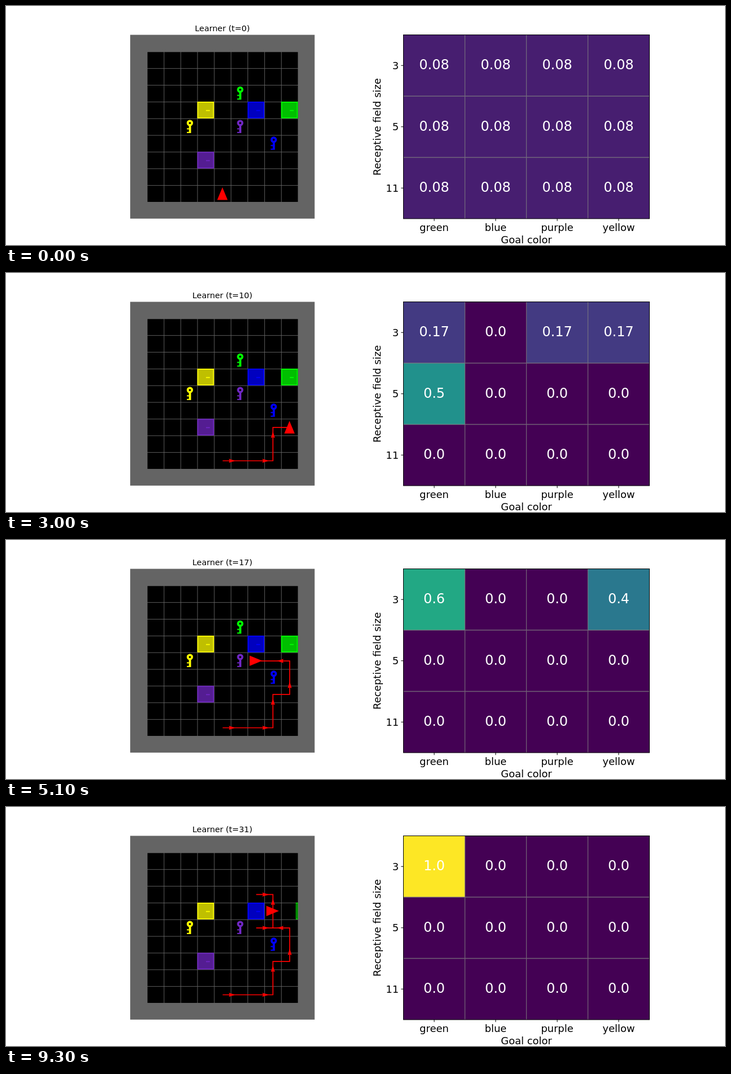
These frames come from a looping animation (1280x427 px, 9.6 s). An HTML page:

```html
<!DOCTYPE html>
<html lang="en">
<head>
<meta charset="utf-8">
<title>Learner</title>
<style>
  html, body { margin: 0; width: 100%; height: 100%; overflow: hidden; background: #fff; }
  svg { display: block; width: 100%; height: 100%; font-family: "DejaVu Sans", sans-serif; }
</style>
</head>
<body>
<svg id="stage" viewBox="0 0 1280 427"></svg>
<script>
const STEP_MS = 300, STEPS = 32;
const stage = document.getElementById('stage');

// Drawing helpers
const rect = (x, y, w, h, fill, extra = '') =>
  `<rect x="${x}" y="${y}" width="${w}" height="${h}" fill="${fill}" ${extra}/>`;
const text = (x, y, size, str, anchor = 'middle', extra = '') =>
  `<text x="${x}" y="${y}" font-size="${size}" text-anchor="${anchor}" ${extra}>${str}</text>`;
const path = (d, stroke, width) =>
  `<path d="${d}" fill="none" stroke="${stroke}" stroke-width="${width}"/>`;

// Grid world
const CELL = 29.85, GRID_X = 221.1, GRID_Y = 51.5;
const COLORS = { green: [0, 255, 0], blue: [0, 0, 255], purple: [112, 39, 195], yellow: [255, 255, 0] };
const KEYS = { green: [6, 3], yellow: [3, 5], purple: [6, 5], blue: [8, 6] };
const DOORS = { yellow: [4, 4], blue: [7, 4], green: [9, 4], purple: [4, 7] };
const rgb = c => `rgb(${c.map(Math.round)})`;

// Content is drawn in unit-cell coordinates
const tile = ([col, row], content) =>
  `<g transform="translate(${GRID_X + col * CELL} ${GRID_Y + row * CELL}) scale(${CELL})">${content}</g>`;
const box = (x0, x1, y0, y1, fill) => rect(x0, y0, x1 - x0, y1 - y0, fill);

function key(name) {
  const c = rgb(COLORS[name]);
  return tile(KEYS[name], box(.5, .63, .31, .88, c) + box(.38, .51, .59, .66, c) + box(.38, .51, .81, .88, c) +
    `<circle cx=".56" cy=".28" r=".19" fill="${c}"/><circle cx=".56" cy=".28" r=".064"/>`);
}

function door(name, open) {
  const c = rgb(COLORS[name]);
  return tile(DOORS[name], open
    ? box(.88, 1, 0, 1, c) + box(.92, .96, .04, .96, '#000')
    : box(0, 1, 0, 1, c) + box(.06, .94, .06, .94, rgb(COLORS[name].map(v => v * .75))) + box(.52, .75, .5, .56, c));
}

function emptyGrid() {
  let out = rect(GRID_X, GRID_Y, 11 * CELL, 11 * CELL, '#646464');
  for (let row = 1; row <= 9; row++)
    for (let col = 1; col <= 9; col++) out += tile([col, row], box(.031, 1, .031, 1, '#000'));
  return out;
}

// F forward, L/R turn, P pick up, T toggle door
const ACTIONS = 'RFFFLFFRFLFFLFFRRFLFFLFPRRFRFLT';
const HEADINGS = [[1, 0], [0, 1], [-1, 0], [0, -1]];

function simulate(t) {
  let heading = 3, pos = [5, 9], hasKey = false, open = false;
  const trail = [pos];
  for (const action of ACTIONS.slice(0, t)) {
    if (action === 'R') heading = (heading + 1) % 4;
    if (action === 'L') heading = (heading + 3) % 4;
    if (action === 'P') hasKey = true;
    if (action === 'T') open = true;
    if (action === 'F') trail.push(pos = pos.map((v, i) => v + HEADINGS[heading][i]));
  }
  return { heading, pos, trail, hasKey, open };
}

function drawTrail(trail) {
  const points = trail.map(([c, r]) => [GRID_X + (c + .5) * CELL + .4, GRID_Y + (r + .5) * CELL + .4]);
  if (points.length < 2) return '';
  let out = path('M' + points.join('L'), '#f00', 1.7);
  // every other move carries an arrowhead
  for (let i = 1; i < points.length; i += 2) {
    const [[x0, y0], [x1, y1]] = [points[i - 1], points[i]];
    const angle = Math.atan2(y1 - y0, x1 - x0) * 180 / Math.PI;
    out += `<path d="M8 0L-4 -3.6L-2.5 0L-4 3.6Z" fill="#f00"
      transform="translate(${(x0 + x1) / 2} ${(y0 + y1) / 2}) rotate(${angle})"/>`;
  }
  return out;
}

function drawWorld(t) {
  const { heading, pos, trail, hasKey, open } = simulate(t);
  const keys = Object.keys(KEYS).filter(k => !(hasKey && k === 'green'));
  const agent = `<path d="M.12 .19L.87 .5L.12 .81Z" fill="#f00" transform="rotate(${heading * 90} .5 .5)"/>`;
  return text(385.2, 45, 14.4, `Learner (t=${t})`) + emptyGrid() +
    Object.keys(DOORS).map(d => door(d, open && d === 'green')).join('') +
    keys.map(key).join('') + tile(pos, agent) + drawTrail(trail);
}

// Beliefs: rows are field sizes 3, 5, 11; columns are goal colors
const GOALS = ['green', 'blue', 'purple', 'yellow'], SIZES = [3, 5, 11];
const EARLY = [.011, .011, .011, .011, .01, .04, .001, .001, .001, .9, .001, .001];
const FACING_BLUE = [.01, .01, .01, .01, .01, .02, 0, 0, 0, .93, 0, 0];
// From step 8 on: green/3, purple/3, yellow/3, green/5
const LATE = [
  [.22, .22, .22, .33], [.19, .19, .19, .43], [.17, .17, .17, .5], [.17, .17, .17, .5], [.17, .17, .17, .5],
  [.2, .2, .2, .4], [.33, .33, .33, 0], [.2, .6, .2, 0], [.5, 0, .5, 0], [.6, 0, .4, 0], [.8, 0, .2, 0],
  [.95, 0, .05, 0], [.98, 0, .02, 0], [.99, 0, .01, 0], [1, 0, 0, 0]
];

function beliefs(t) {
  if (t <= 6) {
    const weights = EARLY.map(p => p ** (t / 6));
    const sum = weights.reduce((a, b) => a + b);
    return weights.map(w => w / sum);
  }
  if (t === 7) return FACING_BLUE;
  const [g3, p3, y3, g5] = LATE[Math.min(t - 8, LATE.length - 1)];
  return [g3, 0, p3, y3, g5, 0, 0, 0, 0, 0, 0, 0];
}

const VIRIDIS = [0x440154, 0x482475, 0x414487, 0x355f8d, 0x2a788e, 0x21918c,
  0x22a884, 0x44bf70, 0x7ad151, 0xbddf26, 0xfde725];
function viridis(v) {
  const i = Math.min(9, Math.floor(v * 10 + 1e-9)), f = v * 10 - i;
  return rgb([16, 8, 0].map(s => {
    const a = VIRIDIS[i] >> s & 255, b = VIRIDIS[i + 1] >> s & 255;
    return a + (b - a) * f;
  }));
}

const format = v => {
  const r = Math.round(v * 100) / 100;
  return Number.isInteger(r) ? r.toFixed(1) : String(r);
};

const MAP_X = 707.5, MAP_Y = 51.5, MAP_CELL = 109.5, MAP_W = 4 * MAP_CELL, MAP_H = 3 * MAP_CELL;

function drawHeatmap(t) {
  let cells = '', labels = '', lines = '', axes = '';
  beliefs(t).forEach((v, i) => {
    const x = MAP_X + i % 4 * MAP_CELL, y = MAP_Y + Math.floor(i / 4) * MAP_CELL;
    cells += rect(x, y, MAP_CELL, MAP_CELL, viridis(v), 'shape-rendering="crispEdges"');
    labels += text(x + MAP_CELL / 2, y + 61.7, 24, format(v), 'middle', 'fill="#fff"');
  });
  for (let i = 1; i < 4; i++) lines += `M${MAP_X + i * MAP_CELL} ${MAP_Y}v${MAP_H}`;
  for (let i = 1; i < 3; i++) lines += `M${MAP_X} ${MAP_Y + i * MAP_CELL}h${MAP_W}`;
  GOALS.forEach((name, i) => {
    const x = MAP_X + (i + .5) * MAP_CELL;
    axes += path(`M${x} ${MAP_Y + MAP_H}v4.2`, '#000', 1) + text(x, 402.3, 18, name);
  });
  SIZES.forEach((size, i) => {
    const y = MAP_Y + (i + .5) * MAP_CELL;
    axes += path(`M${MAP_X} ${y}h-4.2`, '#000', 1) + text(699.1, y + 6.7, 18, size, 'end');
  });
  return cells + path(lines, 'rgba(128,128,128,.75)', 1.3) + labels +
    rect(MAP_X, MAP_Y, MAP_W, MAP_H, 'none', 'stroke="#000" stroke-width="1"') + axes +
    text(926.5, 423.6, 18, 'Goal color') +
    text(0, 0, 18, 'Receptive field size', 'middle', 'transform="translate(667 216) rotate(-90)"');
}

let shown = -1;
function frame() {
  const t = Math.floor(performance.now() / STEP_MS) % STEPS;
  if (t !== shown) {
    stage.innerHTML = drawWorld(t) + drawHeatmap(t);
    shown = t;
  }
  requestAnimationFrame(frame);
}
frame();
</script>
</body>
</html>
```
